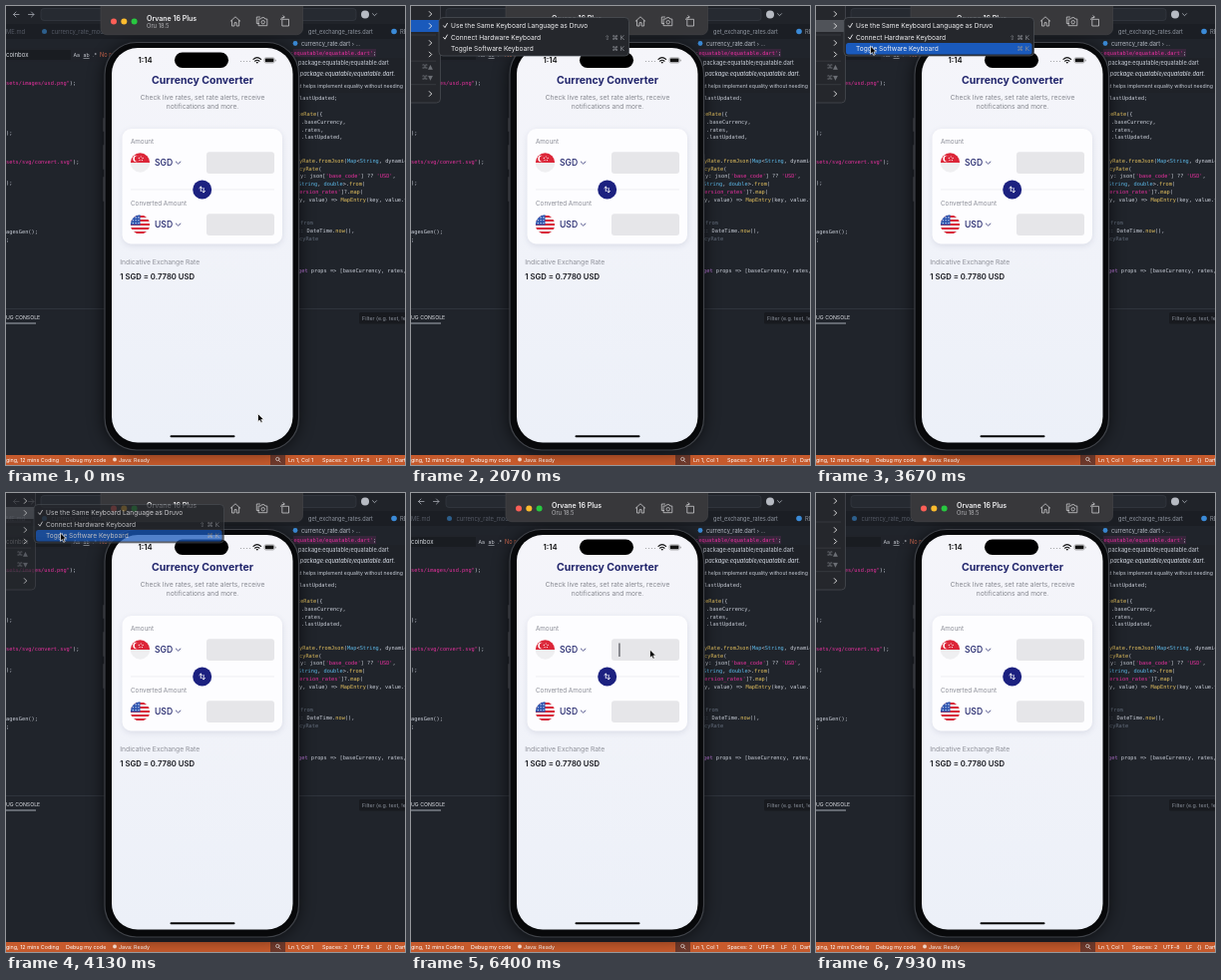
Write an HTML page that moves like this. It is 400 px wide and 460 px high and loops after 8000 ms.

```html
<!DOCTYPE html>
<html lang="en">
<head>
<meta charset="utf-8">
<title>Currency Converter</title>
<style>
  html, body { margin: 0; width: 100%; height: 100%; overflow: hidden; background: #20242b; }
  svg { display: block; width: 400px; height: 460px; font-family: Inter, sans-serif; }
  text { white-space: pre; }
  .mono { font-family: "DejaVu Sans Mono", monospace; font-size: 5.3px; }
  .keys { font-family: "DejaVu Sans", sans-serif; font-size: 6.4px; text-anchor: end; }
  .line { fill: none; stroke-linecap: round; stroke-linejoin: round; }
</style>
</head>
<body>
<svg id="stage" viewBox="0 0 400 460">
  <defs>
    <linearGradient id="paper" x1="0" y1="0" x2="0" y2="1">
      <stop offset="0" stop-color="#f5f5fa"/>
      <stop offset="1" stop-color="#ecf0f8"/>
    </linearGradient>
    <filter id="soft" x="-20%" y="-20%" width="140%" height="140%"><feGaussianBlur stdDeviation="3"/></filter>
    <filter id="wide" x="-20%" y="-20%" width="140%" height="140%"><feGaussianBlur stdDeviation="8"/></filter>
    <clipPath id="disc"><circle r="9.7"/></clipPath>
  </defs>
  <g id="editor"></g>
  <g id="phone"></g>
  <g id="titlebar"></g>
  <g id="menus">
    <g id="menu"></g>
    <g id="submenu"></g>
  </g>
  <path id="pointer" d="M0 0V8.2L1.9 6.5 3.2 9.3 4.7 8.6 3.4 5.9H6Z" fill="#000" stroke="#fff" stroke-width=".7"/>
</svg>
<script>
const $ = id => document.getElementById(id);
const escapeText = s => s.replace(/&/g, '&amp;').replace(/</g, '&lt;');
const rect = (x, y, w, h, fill, r = 0, more = '') =>
  `<rect x="${x}" y="${y}" width="${w}" height="${h}" rx="${r}" fill="${fill}" ${more}/>`;
const dot = (x, y, r, fill) => `<circle cx="${x}" cy="${y}" r="${r}" fill="${fill}"/>`;
const text = (x, y, size, fill, s, more = '') =>
  `<text x="${x}" y="${y}" font-size="${size}" fill="${fill}" ${more}>${escapeText(s)}</text>`;
const line = (d, color, width = .8, more = '') =>
  `<path class="line" d="${d}" stroke="${color}" stroke-width="${width}" ${more}/>`;

// Code is written as color-letter/text pairs.
const ink = { w: '#c9ced8', p: '#e8309f', b: '#5cb8e8', y: '#e3c05e', c: '#66707f', v: '#c27be0' };
const code = (x, y, ...parts) => {
  let spans = '';
  for (let i = 0; i < parts.length; i += 2)
    spans += `<tspan fill="${ink[parts[i]]}">${escapeText(parts[i + 1])}</tspan>`;
  return `<text class="mono" x="${x}" y="${y}">${spans}</text>`;
};

function drawEditor() {
  const dim = '#555a65';
  return rect(0, 0, 400, 460, '#20242b')
    + rect(0, 0, 400, 18, '#202329') + rect(0, 18, 400, 15, '#1b1e24')
    + rect(35, 2.5, 316, 12, '#262a31', 3, 'stroke="#3a3f47" stroke-width=".6"')
    + line('M13 8.5H7.5M10 6L7.5 8.5 10 11', '#a5a9b1')
    + line('M22.5 8.5H28M25.5 6L28 8.5 25.5 11', '#a5a9b1')
    + dot(360, 8.5, 4, '#b7bbc3') + line('M367.5 7.7L369.5 9.7 371.5 7.7', '#b7bbc3')
    + text(0, 27.5, 5.8, dim, 'ME.md')
    + dot(38.5, 25.5, 2.5, '#2d5f8c') + text(45.5, 27.5, 5.8, dim, 'currency_rate_model.dart')
    + text(303, 27.5, 5.6, '#8f959f', 'get_exchange_rates.dart')
    + dot(389, 25.5, 2.8, '#3b8bd8') + text(395, 27.5, 5.8, '#8f959f', 'README')
    + dot(290, 37.5, 2.4, '#3b8bd8') + text(296, 39.5, 5.7, '#b5bac4', 'currency_rate.dart › …')
    // Find bar
    + rect(0, 42, 97, 14, '#20232a') + rect(-2, 44, 67, 10, '#191c21')
    + text(0, 51, 6, '#d5d8de', 'coinbox')
    + text(67.5, 51, 5.2, '#c5c9d0', 'Aa') + text(77.5, 51, 5.2, '#c5c9d0', 'ab', 'text-decoration="underline"')
    + text(87, 51, 5.2, '#c5c9d0', '.*') + text(94, 51, 5.6, '#d4694e', 'No results')
    // Left file
    + code(0, 79, 'p', 'sets/images/usd.png"', 'w', ');')
    + code(0, 128.5, 'w', ');') + code(0, 158, 'p', 'sets/svg/convert.svg"', 'w', ');')
    + code(0, 178.5, 'w', ');') + code(0, 228, 'w', 'agesGen();') + code(0, 236, 'w', ';')
    // Right file
    + rect(288, 43, 83, 8, '#38263c') + code(282, 48.6, 'p', "e:equatable/equatable.dart'", 'w', ';')
    + code(294, 94, 'w', 'lastUpdated;')
    + code(276, 109.5, 'y', 'ncyRateRate', 'w', '({')
    + code(296, 117.5, 'w', '.baseCurrency,') + code(296, 125.5, 'w', '.rates,')
    + code(296, 133.3, 'w', '.lastUpdated,')
    + code(294, 156.5, 'y', 'yRate', 'w', '.', 'y', 'fromJson', 'w', '(', 'b', 'Map', 'w', '<', 'b', 'String', 'w', ', dynamic>')
    + code(294, 164.5, 'y', 'cyRate', 'w', '(')
    + code(295, 172.3, 'w', 'y: json[', 'p', "'base_code'", 'w', '] ?? ', 'p', "'USD'", 'w', ',')
    + code(293, 180.2, 'b', 'String', 'w', ', ', 'b', 'double', 'w', '>.', 'y', 'from', 'w', '(')
    + code(291, 188, 'p', "version_rates'", 'w', ']?.', 'y', 'map', 'w', '(')
    + code(294, 195.8, 'w', 'y, value) => ', 'y', 'MapEntry', 'w', '(key, value.toDouble')
    + code(295, 219, 'c', 'from') + code(292, 227, 'c', 't: ', 'w', 'DateTime.', 'y', 'now', 'w', '(),')
    + code(294, 235, 'c', 'cyRate')
    + code(293, 266.5, 'v', 'get ', 'w', 'props => [baseCurrency, rates, last')
    // Hover card
    + rect(286, 52, 120, 35, '#1f2228')
    + text(293, 59, 5.6, '#c9ced8', 'package:equatable/equatable.dart')
    + text(293, 69.5, 5.6, '#c9ced8', '.package:equatable/equatable.dart.', 'font-style="italic" font-weight="500"')
    + text(292, 81.5, 5.1, '#c9ced8', 'st helps implement equality without needing')
    // Panel and status bar
    + rect(0, 303, 400, .7, '#363b44')
    + text(0, 314.3, 5.2, '#e3e5ea', 'UG CONSOLE') + rect(0, 317.6, 30, .8, '#c9ced8')
    + rect(354, 307, 50, 11.5, '#181a1f', 1.5)
    + text(357, 315, 5.3, '#8d939e', 'Filter (e.g. text, !exclude)')
    + rect(0, 450, 400, 10, '#c65a2c') + rect(265, 450, 15, 10, '#6f3a2c')
    + line('M273.5 455.5L275 457M274 454a1.7 1.7 0 1 1 -3.4 0a1.7 1.7 0 1 1 3.4 0', '#fff', .6)
    + dot(109, 454.5, 1.9, '#f3d9cc')
    + [[0, 'ging, 12 mins Coding'], [60, 'Debug my code'], [113, 'Java: Ready'], [283, 'Ln 1, Col 1'],
       [317, 'Spaces: 2'], [348, 'UTF-8'], [371, 'LF'], [382, '{}'], [390, 'Dart']]
      .map(([x, s]) => text(x, 456.6, 5.4, '#fff', s)).join('');
}

const singapore = rect(-10, -10, 20, 10, '#dc2638') + rect(-10, 0, 20, 10, '#efeff1')
  + dot(-4, -4, 3.2, '#fff') + dot(-2.7, -4, 2.9, '#dc2638')
  + [0, 1, 2, 3, 4].map(i => dot(.7 + 2 * Math.sin(i * 1.257), -4 - 2 * Math.cos(i * 1.257), .6, '#fff')).join('');
const america = rect(-10, -10, 20, 20, '#f2f2f4')
  + [0, 1, 2, 3, 4].map(i => rect(-10, -9 + i * 4, 20, 2, '#d92b3c')).join('')
  + rect(-10, -10, 10, 10.5, '#2a52ae')
  + [...Array(9).keys()].map(i => dot(-7.2 + i % 3 * 2.8, -7 + Math.floor(i / 3) * 2.8, .65, '#fff')).join('');

const amountRow = (y, label, flag, currency) =>
  text(125, y - 18.7, 6.3, '#8b8d96', label)
  + `<g transform="translate(134.5 ${y})" clip-path="url(#disc)">${flag}</g>`
  + text(149, y + 3.2, 8.6, '#20246b', currency, 'font-weight="500"')
  + line(`M170.3 ${y - 1}L172.6 ${y + 1.2} 174.9 ${y - 1}`, '#3a3e7c', .9)
  + rect(201, y - 10.7, 68, 21.7, '#e6e6e9', 3);

function drawPhone() {
  const centered = 'text-anchor="middle"';
  return rect(97, 38, 197, 409, '#000', 34, 'filter="url(#wide)" opacity=".6"')
    + [[97, 112, 14], [97, 139, 25], [97, 171, 25], [292.5, 148, 40]]
      .map(([x, y, h]) => rect(x, y, 2, h, '#2c2e33', 1)).join('')
    + rect(99, 36.5, 194.5, 408.5, '#08090b', 32, 'stroke="#3f4248" stroke-width="1.2"')
    + rect(106, 42, 181.5, 395.5, 'url(#paper)', 26)
    + rect(169, 46.5, 54, 15.5, '#000', 7.75)
    + text(132.5, 57.3, 7.7, '#111', '1:14', 'font-weight="600"')
    + [235.5, 238.5, 241.5, 244.5].map(x => dot(x, 55.5, .6, '#9a9ba0')).join('')
    + line('M248 53.4Q251.8 49.9 255.6 53.4M249.6 55.2Q251.8 53.3 254 55.2', '#111', 1.2) + dot(251.8, 56.6, .9, '#111')
    + rect(259, 51.8, 10.2, 5.2, 'none', 1.6, 'stroke="#888" stroke-width=".6"')
    + rect(259.8, 52.6, 8.6, 3.6, '#111', .9) + rect(269.9, 53.6, .8, 1.8, '#888', .4)
    + text(197, 78.2, 10.5, '#20246b', 'Currency Converter', centered + ' font-weight="700"')
    + text(197, 93.6, 6.7, '#85878f', 'Check live rates, set rate alerts, receive', centered)
    + text(197, 103.2, 6.7, '#85878f', 'notifications and more.', centered)
    + rect(117, 125, 160, 115, '#5b6285', 9, 'filter="url(#soft)" opacity=".17"')
    + rect(116.5, 123, 160.5, 115.5, '#fdfdff', 9)
    + rect(125, 183.6, 144, .7, '#e8e8ed')
    + amountRow(157, 'Amount', singapore, 'SGD')
    + amountRow(219, 'Converted Amount', america, 'USD')
    + dot(196.7, 184, 9.5, '#1c2180')
    + line('M195.3 185.6V181.2M193.9 182.5L195.3 181.1 196.5 182.4M198.1 182.4V186.8M196.9 185.6L198.1 186.9 199.5 185.5', '#fff', .9)
    + text(114.3, 258.6, 6.74, '#8f9199', 'Indicative Exchange Rate')
    + text(114.3, 274.2, 7.7, '#15161c', '1 SGD = 0.7780 USD', 'font-weight="600"')
    + rect(164.5, 430.3, 65, 2, '#000', 1)
    + rect(208.4, 150.5, 1.1, 13.5, '#42434b', 0, 'id="caret"');
}

function drawTitlebar() {
  const c = '#c8c8cb';
  return rect(95, -8, 202.5, 36.7, '#38383b', 6, 'stroke="#47474b" stroke-width=".6"')
    + dot(108, 15.5, 3, '#fe5f57') + dot(118.3, 15.5, 3, '#febc2e') + dot(128.6, 15.5, 3, '#28c840')
    + text(141, 15.4, 7, '#f0f0f2', 'Orvane 16 Plus', 'font-weight="600"')
    + text(141, 22.2, 5.8, '#b2b2b6', 'Oru 18.5')
    + line('M225.2 15.2L230 10.8 234.8 15.2M226.5 14.5V20H229V16.7H231.2V20H233.6V14.5', c)
    + line('M253.5 13H255.5L256.3 11.7H259L259.8 13H261.8V19.7H253.5ZM253.5 17.5H251.3V11H254.5', c)
    + `<circle cx="257.7" cy="16.2" r="1.7" fill="none" stroke="${c}" stroke-width=".8"/>`
    + line('M277.2 13.3H283.5V20H277.2ZM275.5 13.5Q275.7 10.9 279 11M277.8 9.7L279.2 11 277.8 12.3', c);
}

const menuFill = '#25272c', activeFill = '#1a5abc';
function drawMenu() {
  return rect(-10, -10, 39.5, 107, menuFill, 4, 'stroke="#4c4f55" stroke-width=".7"')
    + rect(-5, 1, 33.5, 13, activeFill, 1, 'id="first"')
    + rect(-5, 14, 33.5, 12, activeFill, 1, 'id="second"')
    + [28.7, 54.8, 78.5].map(y => rect(0, y, 25, .6, '#414449')).join('')
    + [8, 20, 37, 48.5, 88].map(y => line(`M18.3 ${y - 2.4}L20.7 ${y} 18.3 ${y + 2.4}`, '#eee', .9)).join('')
    + text(22, 62.5, 6.4, '#6c6f75', '⌘▲', 'class="keys"') + text(22, 74, 6.4, '#6c6f75', '⌘▼', 'class="keys"');
}

function drawSubmenu() {
  const items = [['Use the Same Keyboard Language as Druvo', ''], ['Connect Hardware Keyboard', '⇧ ⌘ K'], ['Toggle Software Keyboard', '⌘ K']];
  return rect(28, 11.5, 190.5, 38.5, menuFill, 4, 'stroke="#505359" stroke-width=".7"')
    + rect(30, 13.7, 186.5, 11.6, activeFill, 2.5, 'id="hover"')
    + items.map(([label, keys], i) => {
      const y = 22 + i * 11.6;
      return (i < 2 ? line(`M32.6 ${y - 2.2}L34 ${y - .4} 36.4 ${y - 4.6}`, '#f2f2f4', .9) : '')
        + text(40, y, 6.6, '#f2f2f4', label) + text(214, y, 6.4, '#8f9298', keys, 'class="keys"');
    }).join('');
}

$('editor').innerHTML = drawEditor();
$('phone').innerHTML = drawPhone();
$('titlebar').innerHTML = drawTitlebar();
$('menu').innerHTML = drawMenu();
$('submenu').innerHTML = drawSubmenu();

// Pointer stops: time, x, y
const route = [[0, 252.5, 408.5], [800, 252.5, 408.5], [1250, -10, -12], [1500, -10, 5], [1600, -10, 18],
  [2900, -10, 18], [3150, 42, 19], [3450, 53, 29], [3650, 54.5, 40], [4280, 54.5, 40],
  [4950, 255.5, 122], [5110, 255.5, 122], [5280, 239.5, 157], [6850, 239.5, 157], [7350, -10, -12], [8000, -10, -12]];

function pointerAt(t) {
  const i = route.findIndex(stop => stop[0] > t);
  const [t0, x0, y0] = route[i - 1], [t1, x1, y1] = route[i];
  const u = (t - t0) / (t1 - t0), k = u * u * (3 - 2 * u);
  return [x0 + (x1 - x0) * k, y0 + (y1 - y0) * k];
}

const show = (id, on) => $(id).style.display = on ? '' : 'none';
const within = (t, from, to) => t >= from && t < to;

function render(t) {
  const [x, y] = pointerAt(t);
  const inside = x > 28;
  $('pointer').setAttribute('transform', `translate(${x} ${y})`);
  show('menu', within(t, 1270, 4280) || t >= 7500);
  show('submenu', within(t, 1700, 4280));
  show('first', within(t, 1330, 1540));
  show('second', within(t, 1540, 4280));
  $('second').setAttribute('fill', inside ? '#505359' : activeFill);
  show('hover', inside);
  const row = Math.max(0, Math.min(2, Math.floor((y - 13.7) / 11.6)));
  $('hover').setAttribute('y', 13.7 + row * 11.6);
  $('menus').setAttribute('opacity', within(t, 4080, 4280) ? 1 - (t - 4080) / 200 : 1);
  show('caret', t >= 5300 && (t - 5300) % 1000 < 500);
}

const start = performance.now();
function tick() {
  render((performance.now() - start) % 8000);
  requestAnimationFrame(tick);
}
tick();
</script>
</body>
</html>
```
